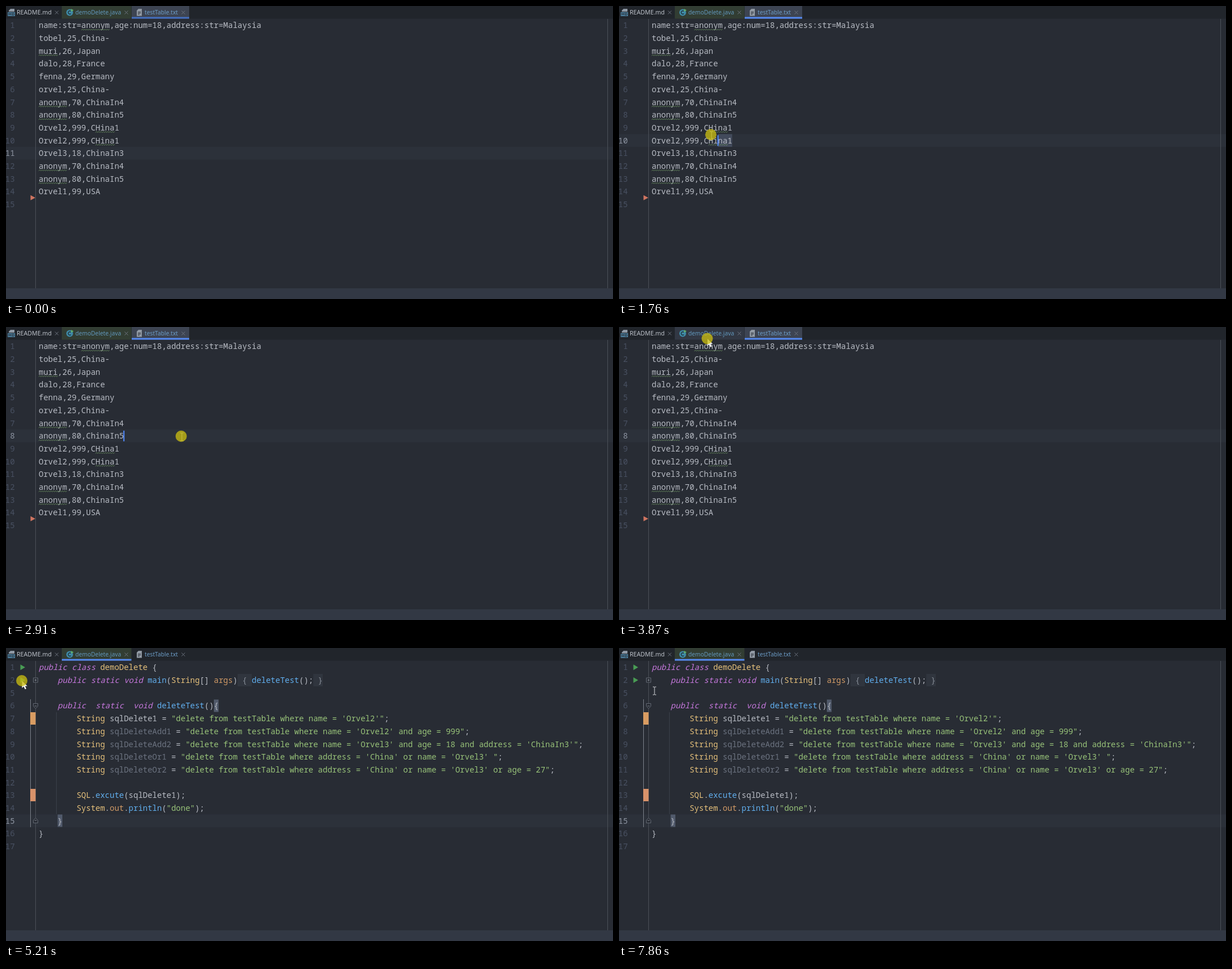
An HTML page for the animation above (8 s loop, 1077x520 px).

```html
<!DOCTYPE html>
<html lang="en">
<head>
<meta charset="utf-8">
<title>Editor</title>
<style>
html, body { margin: 0; width: 100%; height: 100%; overflow: hidden; background: #282c34; }
svg { display: block; }
text { white-space: pre; font-kerning: none; }
.code { font: 14px "Noto Sans Mono", "Liberation Mono", monospace; font-variant-ligatures: none; }
.ui { font: 10.25px "Noto Sans", "Noto Sans CJK SC", "Noto Sans CJK", sans-serif; }
.num { fill: #495162; text-anchor: end; }
.w { fill: #b8bcc4; } .k { fill: #c678dd; font-style: italic; } .y { fill: #e5c07b; }
.b { fill: #61afef; } .o { fill: #d19a66; } .g { fill: #98c379; }
.u { fill: #6c7380; } .f { fill: #868c96; }
</style>
</head>
<body>
<svg id="stage" width="1077" height="520" viewBox="0 0 1077 520"></svg>
<script>
const LOOP = 8000, X0 = 58, CW = 8.4, ROW = 22.7;
const rowTop = n => 23 + (n - 1) * ROW;
const baseline = n => rowTop(n) + 16.3;
const colX = c => X0 + c * CW;
const esc = s => s.replace(/&/g, '&amp;').replace(/</g, '&lt;');
const rect = (x, y, w, h, fill, more = '') =>
  `<rect x="${x}" y="${y}" width="${w}" height="${h}" fill="${fill}" ${more}/>`;
const path = (d, fill, stroke = 'none', more = '') =>
  `<path d="${d}" fill="${fill}" stroke="${stroke}" ${more}/>`;
const play = (x, y, w, h, fill) => path(`M${x} ${y - h / 2}l${w} ${h / 2}l${-w} ${h / 2}z`, fill);
const ui = (x, y, s, fill, more = '') => `<text class="ui" x="${x}" y="${y}" fill="${fill}" ${more}>${s}</text>`;

// One row: segments split by "¦", first character is the colour class.
function codeRow(row, src) {
  let col = 0, out = '';
  for (const seg of src.split('¦')) {
    const s = seg.slice(1), pad = s.length - s.trimStart().length;
    if (s.trim()) out += `<text class="code ${seg[0]}" x="${colX(col + pad)}" y="${baseline(row)}">${esc(s.trim())}</text>`;
    col += s.length;
  }
  return out;
}
const numbers = (list, id) => list.map((n, i) =>
  `<text class="code num" id="${id}${i + 1}" x="15.6" y="${baseline(i + 1)}">${n}</text>`).join('');

function squiggle(row, from, to) {
  let d = `M${colX(from)} ${rowTop(row) + 20}`;
  for (let x = colX(from), up = 1; x < colX(to) - 1; x += 2, up = -up) d += `l2 ${-2 * up}`;
  return path(d, 'none', '#6b9060', 'stroke-width=".9"');
}

const tableRows = [
  'name:str=anonym,age:num=18,address:str=Malaysia', 'tobel,25,China-', 'muri,26,Japan',
  'dalo,28,France', 'fenna,29,Germany', 'orvel,25,China-', 'anonym,70,ChinaIn4',
  'anonym,80,ChinaIn5', 'Orvel2,999,CHina1', 'Orvel2,999,CHina1', 'Orvel3,18,ChinaIn3',
  'anonym,70,ChinaIn4', 'anonym,80,ChinaIn5', 'Orvel1,99,USA'];

const query = (name, cls, sql) => `w        ¦yString ¦${cls}${name}¦w = ¦g"delete from testTable where ${sql}"¦w;`;
const javaRows = [
  'kpublic class ¦ydemoDelete ¦w{',
  'w    ¦kpublic ¦kstatic ¦kvoid ¦bmain¦w(¦yString¦w[] ¦oargs¦w)¦f { ¦bdeleteTest¦w();¦f }',
  '',
  'w    ¦kpublic  ¦kstatic  ¦kvoid ¦bdeleteTest¦w(){',
  query('sqlDelete1', 'w', "name = 'Orvel2'"),
  query('sqlDeleteAdd1', 'u', "name = 'Orvel2' and age = 999"),
  query('sqlDeleteAdd2', 'u', "name = 'Orvel3' and age = 18 and address = 'ChinaIn3'"),
  query('sqlDeleteOr1', 'u', "address = 'China' or name = 'Orvel3' "),
  query('sqlDeleteOr2', 'u', "address = 'China' or name = 'Orvel3' or age = 27"),
  '',
  'w        ¦ySQL¦w.¦bexcute¦w(sqlDelete1);',
  'w        ¦ySystem¦w.¦oout¦w.¦bprintln¦w(¦g"done"¦w);',
  'w    }',
  'w}'];

const count = (a, b) => Array.from({ length: b - a + 1 }, (_, i) => a + i);

function tableView() {
  const marks = [[1, 9, 15], [3, 0, 4], [7, 0, 6], [8, 0, 6], [9, 12, 16], [10, 12, 16], [12, 0, 6], [13, 0, 6]];
  return rect(0, 0, 1077, ROW, '#2c313a', 'id="current"') +
    rect(0, 0, 0, ROW, '#424a5b', 'id="selA"') + rect(X0, rowTop(10), 0, ROW, '#424a5b', 'id="selB"') +
    rect(52, 23, 1, 478, '#4b5058') +
    numbers(count(1, 15), 'n') + tableRows.map((s, i) => codeRow(i + 1, 'w' + s)).join('') +
    marks.map(m => squiggle(...m)).join('') + play(43.5, 340.3, 8.5, 9, '#cf7561') +
    rect(0, 0, 2, 19, '#528bff', 'id="caret"');
}

function foldMark(y, dir) {
  const shape = dir ? `M48.5 ${y - 4.5 * dir}h8v${5 * dir}l-4 ${4 * dir}l-4 ${-4 * dir}z` : `M48.5 ${y - 4}h8v8h-8z`;
  return path(shape, '#282c34', '#626873') +
    path(`M50.5 ${y}h4` + (dir ? '' : `M52.5 ${y - 2}v4`), 'none', '#7c828c');
}

function javaView() {
  const brace = '#515a6b', fold = '#30353e';
  return rect(0, rowTop(13), 1077, ROW, '#2c313a') + rect(52, 23, 1, 478, '#4b5058') +
    rect(43, 91, 1, 227, '#7d838c') + rect(89, 114, 1, 181, '#3a3f49') +
    rect(43, 114, 9.5, 22, '#d99c62') + rect(43, 250, 9.5, 22, '#d8926a') +
    rect(colX(42), 46, CW * 3, 22, fold) + rect(colX(58), 46, CW * 2, 22, fold) +
    rect(colX(37), 91.5, CW, 22, brace) + rect(colX(4), 295.5, CW, 22, brace) +
    numbers([1, 2, ...count(5, 17)], 'j') + javaRows.map((s, i) => s && codeRow(i + 1, s)).join('') +
    play(25.5, 34.3, 8.5, 10, '#499c54') + play(25.5, 57, 8.5, 10, '#499c54') +
    foldMark(57, 0) + foldMark(103, 1) + foldMark(306, -1) +
    rect(99, 297, 2, 19, '#528bff', 'id="javaCaret"');
}

const cross = x => path(`M${x - 3} 8.5l6 6m0 -6l-6 6`, 'none', '#6d7480', 'stroke-width="1"');

function tabBar() {
  return rect(0, 0, 1077, 22.5, '#21252b') +
    rect(99, 0, 123.5, 22.5, '#323d33', 'id="tabJava"') + rect(223, 0, 102, 22.5, '#3d4452', 'id="tabTable"') +
    rect(223, 19.5, 102, 3, '#568af2', 'id="under"') +
    path('M8 5h7v5h-10v-2z', '#8f99a5') + rect(3, 11, 13, 7, '#4d7f9e') +
    path('M5 16.5v-4l2 2.5l2 -2.5v4M11.5 12.5v4h1q1.800 0 1.800 -2t-1.800 -2z', 'none', '#21252b') +
    '<circle cx="113" cy="11.500" r="6" fill="#3f8ba8"/>' +
    path('M115.200 9.500a2.800 2.800 0 1 0 0 4', 'none', '#20323b', 'stroke-width="1.300"') +
    play(115.5, 7.5, 4.5, 5, '#62b36c') +
    path('M235 5h6v12.500h-9v-9.500z', '#9199a3') + path('M234 10.500h5M234 12.500h5M234 14.500h3', 'none', '#30353e') +
    ui(19, 15.3, 'README.md', '#bcc1c9', 'style="font-size:10.650px"') +
    ui(123, 15.3, 'demoDelete.java', '#6298bd') + ui(246, 15.3, 'testTable.txt', '#6c9cc6') +
    cross(90) + cross(213.5) + cross(314.5);
}

function menu() {
  const call = "'demoDelete.main()'", ink = '#bcc1ca', line = i => 71.8 + i * 17.6;
  const first = "<tspan text-decoration='underline'>'</tspan>demoDelete.main()'";
  const clock = y => `<circle cx="38" cy="${y}" r="4.800" fill="none" stroke="#a3a9b2" stroke-width="1.200"/>` +
    path(`M38 ${y - 3}v3h2`, 'none', '#a3a9b2');
  const items = [
    [[50, '运行'], [74, first + '(U)']],
    [[50, '调试'], [74, first + '(D)']],
    [[50, '使用覆盖率运行'], [127.5, call + '(<tspan text-decoration="underline">V</tspan>)']],
    [[50, '使用'], [74, "'Windows Async Profiler'"], [196, '运行'], [223.5, call]],
    [[50, '使用'], [74, "'Java Flight Recorder'"], [180.5, '运行'], [208, call]],
    [[50, '修改运行配置...']]];
  return rect(29, 58.5, 308, 107.5, '#21252b') + rect(29.5, 59, 307, 18, '#4d78cc', 'id="hot"') +
    play(36, 68, 7, 8, '#499c54') +
    '<ellipse cx="38.500" cy="86" rx="3.200" ry="4.500" fill="#499c54"/>' +
    path('M33.500 82l10 8m0 -8l-10 8M33 86h11', 'none', '#499c54', 'stroke-width="1.200"') +
    path('M33.500 98.500l4.500 -1.500l4.500 1.500v4q-1 4 -4.500 5.500q-3.500 -1.500 -4.500 -5.500z', '#a3a9b2') +
    path('M38 99v7q-2.500 -1.500 -3 -4v-2.500z', '#4c525c') + play(39, 104.5, 6, 7, '#499c54') +
    clock(120) + play(39.5, 122.5, 5, 6, '#499c54') + clock(137.5) + play(39.5, 140, 5, 6, '#cf7b50') +
    items.map((parts, i) => parts.map(([x, s]) => ui(x, line(i), s, ink)).join('')).join('') +
    ui(327, line(0), 'Ctrl+Shift+F10', ink, 'text-anchor="end"');
}

document.getElementById('stage').innerHTML =
  rect(0, 0, 1077, 520, '#282c34') +
  `<g id="table">${tableView()}</g><g id="java">${javaView()}</g>` +
  rect(1067, 23, 1, 478, '#4b5058') + rect(0, 501, 1077, 19, '#323844') +
  tabBar() + `<g id="menu">${menu()}</g>` +
  path('M0 0v12.500l3 -2.700l2.200 5l2.300 -1l-2.200 -4.800h4z', '#fff', 'none', 'id="arrow"') +
  path('M-3 -7h2.300l.7 .700l.7 -.700h2.300M0 -6.500v13M-3 7h2.300l.7 -.700l.7 .700h2.300', 'none', '#d8dade', 'id="beam"') +
  '<circle id="press" r="10" fill="#c8bb12" opacity=".78"/>';

const el = {};
document.querySelectorAll('[id]').forEach(e => el[e.id] = e);
const set = (id, attrs) => { for (const a in attrs) el[id].setAttribute(a, attrs[a]); };
const show = (id, on) => set(id, { visibility: on ? 'visible' : 'hidden' });
const within = (t, ...spans) => spans.some(([a, b]) => t >= a && t < b);

const trail = [
  [130, 828, 455], [270, 432, 297], [410, 432, 297], [620, 176, 169], [820, 176, 169], [1410, 216, 238],
  [1690, 216, 238], [1710, 193, 235], [1760, 164.5, 229.5], [2030, 80.5, 222], [2440, 60, 222],
  [2500, 60, 222], [2710, 312, 195], [3080, 312, 195], [3460, 157, 21], [4280, 157, 21],
  [4940, 28.5, 58.5], [5430, 28.5, 58.5], [5630, 63, 76]];

function pointer(t) {
  const i = trail.findIndex(p => p[0] > t);
  if (i < 0) return trail[trail.length - 1].slice(1);
  if (i === 0) return trail[0].slice(1);
  const [a, b] = [trail[i - 1], trail[i]], k = (t - a[0]) / (b[0] - a[0]);
  return [a[1] + (b[1] - a[1]) * k, a[2] + (b[2] - a[2]) * k];
}

function drawTable(t) {
  const dragged = within(t, [1710, 2910]);
  let row = t < 1710 ? 11 : 8, col = 18;
  if (dragged) {
    const [x, y] = pointer(Math.min(t, 2440) - 20);
    row = y < rowTop(10) ? 9 : 10;
    col = Math.max(0, Math.min(17, Math.round((x - X0) / CW)));
    set('selA', { x: colX(col), y: rowTop(row), width: row === 9 ? 1077 - colX(col) : (17 - col) * CW });
  }
  show('selA', dragged);
  show('selB', dragged && row === 9);
  set('selB', { width: 17 * CW });
  set('current', { y: rowTop(row) });
  for (let n = 1; n <= 15; n++) el['n' + n].style.fill = n === row ? '#8f96a3' : '';
  set('caret', { x: colX(col) - 1, y: rowTop(row) + 2 });
  show('caret', within(t, [1710, 3670]));
}

function render(t) {
  const java = t >= 3940, [x, y] = pointer(t);
  el.table.style.display = java ? 'none' : '';
  el.java.style.display = java ? '' : 'none';
  if (java) show('javaCaret', within(t, [3940, 4440], [6210, 6870], [7400, 7860]));
  else drawTable(t);

  const hover = y < 23 && x > 99 && x < 222;
  set('tabJava', { fill: hover && !java ? '#323844' : '#323d33' });
  show('tabTable', !java);
  set('under', { x: java ? 99 : 223, width: java ? 123.5 : 102, fill: t < 1710 ? '#446fc0' : '#568af2' });

  el.menu.style.display = within(t, [5280, 6180]) ? '' : 'none';
  show('hot', t >= 5490);

  const arrow = y < 23 || x < 52 || within(t, [5280, 5890]);
  const at = { transform: `translate(${x} ${y})` };
  set('arrow', at);
  set('beam', at);
  show('arrow', t >= 130 && arrow);
  show('beam', t >= 130 && !arrow);
  const off = arrow ? 0.5 : 1.2;
  set('press', { cx: x - off, cy: y - off });
  show('press', within(t, [1570, 2500], [2910, 3080], [3870, 4080], [5090, 5280], [5890, 6180]));
}

el.j13.style.fill = '#8f96a3';
const start = performance.now();
function tick() {
  render((performance.now() - start) % LOOP);
  requestAnimationFrame(tick);
}
tick();
</script>
</body>
</html>
```
